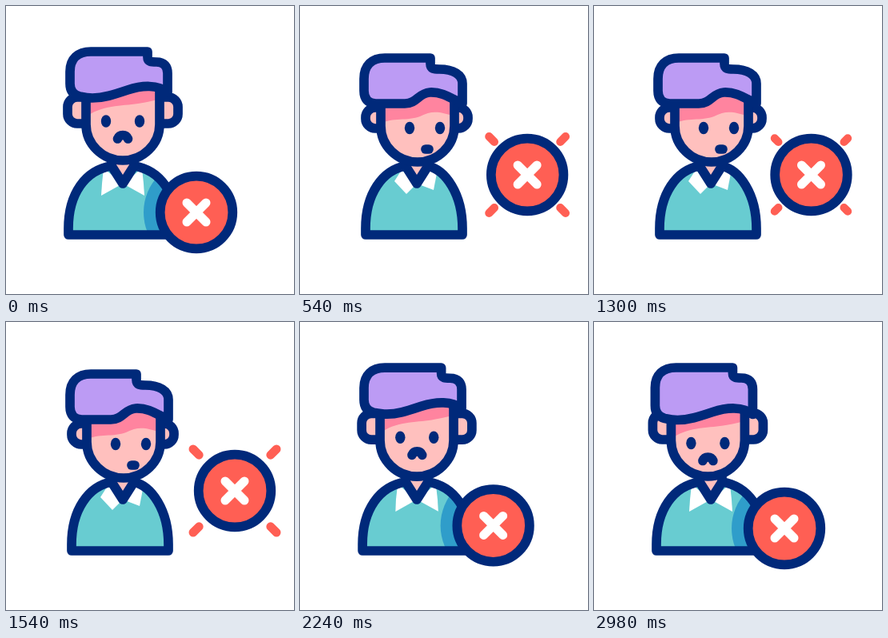
These frames come from a looping animation (360x360 px, 3 s). An HTML page:

```html
<!DOCTYPE html>
<html lang="en">
<head>
<meta charset="utf-8">
<title>Rejected user</title>
<style>
html, body { margin: 0; width: 100%; height: 100%; overflow: hidden; background: #fff; }
svg { display: block; width: 100vw; height: 100vh; }
.line { fill: none; stroke: #00297a; stroke-width: 11.7; stroke-linecap: round; stroke-linejoin: round; }
.skin { fill: #ffc0be; }
.shade { fill: #ff849f; }
.hair { fill: #bc9bf4; }
.shirt { fill: #68ccd1; }
.ink { fill: #00297a; }
.red { fill: #ff5f54; }
</style>
</head>
<body>
<svg viewBox="0 0 360 360">
  <defs><clipPath id="torso"><path class="body"/></clipPath></defs>

  <path class="body shirt"/>
  <g clip-path="url(#torso)"><circle id="shadow" r="66" fill="#2f9dca"/></g>
  <path fill="#fff" data-shape="collarL"/>
  <path fill="#fff" data-shape="collarR"/>
  <path class="skin" d="M132 185H160V200L146 222L132 200Z"/>
  <path class="body line"/>
  <path class="line" d="M132 190V200M160 190V200"/>

  <g id="head">
    <rect class="ear line skin" rx="12"/>
    <rect class="ear line skin" rx="12"/>
    <path class="face skin"/>
    <path class="drop shade" data-shape="fringe"/>
    <path class="face line"/>
    <path class="line hair" data-shape="hair"/>
    <g class="drop">
      <ellipse class="eye ink" rx="6.2" ry="7.7"/>
      <ellipse class="eye ink" rx="6.2" ry="7.7"/>
      <path class="line" data-shape="mouth"/>
    </g>
  </g>

  <g id="badge">
    <path id="burst" fill="none" stroke="#ff5f54" stroke-linecap="round"/>
    <circle class="line red" r="45.3"/>
    <path d="M-12 -12L12 12M12 -12L-12 12" stroke="#fff" stroke-width="11" stroke-linecap="round"/>
  </g>
</svg>
<script>
const LOOP = 3000;

// Each shape: sad pose, surprised pose.
const shapes = {
  collarL: ["M122 203L120 222L119 237L146 222Z", "M127 205L118 219L133 235L146 222Z"],
  collarR: ["M170 203L172 222L173 237L146 222Z", "M164 203L171 209L167 230L146 222Z"],
  fringe: [
    "M100 139C118 124 145 125 165 122C178 120 186 118 192 116L192 96L100 100Z",
    "M101 147C115 139 135 144 150 138C165 130 175 132 193 138L193 105L101 105Z"],
  hair: [
    "M80 97L80 82C80 66 90 57 106 57L177 57L177 64C177 70 182 70 188 70C198 70 202 76 202 84L202 108C190 98 170 99 152 105C134 111 122 115 108 115C102 115 97 114 92 113C84 111 80 106 80 97Z",
    "M80 106L80 91C80 74 90 65 106 65L163 65L163 72C163 79 168 79 174 79C192 79 203 86 203 97L203 122C191 117 179 107 162 108C148 109 146 122 131 122C115 122 105 122 95 122C85 122 80 116 80 106Z"],
  mouth: ["M139.5 166C142 160 150 160 152.5 166", "M157 179C158 179 160 179 161 179"]
};

const mix = (a, b, k) => a + (b - a) * k;
const clamp = k => Math.min(1, Math.max(0, k));
const span = (t, from, to) => clamp((t - from) / (to - from));
const ramp = (t, from, to) => {
  const k = span(t, from, to);
  return k * k * (3 - 2 * k);
};

function morph([a, b], k) {
  const ends = b.match(/[\d.]+/g);
  let i = 0;
  return a.replace(/[\d.]+/g, n => mix(+n, +ends[i++], k).toFixed(2));
}

// Moves only the lower edge of a path.
const lowerEdge = (path, dy) => path.replace(/([\d.]+) ([\d.]+)/g,
  (pair, x, y) => y > 90 ? `${x} ${+y + dy}` : pair);

const bodyPath = (l, r) =>
  `M${l} 286V278C${l} 235 ${l + 21} 205 132 200L146 222L160 200` +
  `C${r - 21} 205 ${r} 235 ${r} 278V286Z`;

const set = (el, attrs) => {
  for (const name in attrs) el.setAttribute(name, attrs[name]);
};
const all = selector => [...document.querySelectorAll(selector)];
const [head, badge, shadow, burst] = all("#head, #badge, #shadow, #burst")
  .sort((a, b) => order(a) - order(b));
function order(el) { return ["head", "badge", "shadow", "burst"].indexOf(el.id); }
const bodies = all(".body"), ears = all(".ear"), eyes = all(".eye");
const drops = all(".drop"), parts = all("[data-shape]");
all(".face").forEach(f => set(f, { d: "M100 112V148C100 173 121 193 146 193S192 173 192 148V106" }));
const faces = all(".face");

function drawBurst(t) {
  const local = t >= 1280 ? t - 800 : t;
  const u = span(local, 480, 980);
  const far = 40 + 14.7 * u ** 0.3;
  const near = Math.min(far, 41 + 13.7 * u * u) - 0.01;
  const width = local < 480 ? 0 : mix(10, 11.5, u) * (1 - span(local, 980, 1060));
  const ray = (x, y) => `M${x * near} ${y * near}L${x * far} ${y * far}`;
  set(burst, {
    d: ray(-1, -1) + ray(1, -1) + ray(1, 1) + ray(-1, 1),
    "stroke-width": width,
    visibility: width ? "visible" : "hidden"
  });
}

function drawHead(t, k) {
  const droop = 7.5 * ramp(t, 2260, 2500);
  const swing = -3.6 * Math.sin(2.5 * Math.PI * span(t, 2260, 2980));
  set(head, { transform: `translate(${swing} 0)` });
  drops.forEach(el => set(el, { transform: `translate(0 ${droop})` }));
  faces.forEach(el => set(el, { transform: `translate(${k} ${2 * k})` }));
  parts.forEach(el => {
    const name = el.dataset.shape, d = morph(shapes[name], k);
    set(el, { d: name === "hair" ? lowerEdge(d, droop) : d });
  });

  const inset = 5 * k;
  ears.forEach((ear, i) => set(ear, {
    x: i ? 180 : 77 + inset, width: 35 - inset,
    y: mix(114, 127, k), height: mix(33, 26, k)
  }));
  eyes.forEach((eye, i) => set(eye, {
    cx: i ? mix(167, 175, k) : mix(125, 137, k), cy: mix(144, 152.5, k)
  }));
}

function draw(t) {
  const pose = ramp(t, 260, 520) - ramp(t, 1925, 2275);
  const back = ramp(t, 1925, 2305);
  const recoil = 0.55 * (ramp(t, 1060, 1220) - ramp(t, 1245, 1365));
  const x = 238 + 48 * (ramp(t, 400, 560) - recoil - back);
  const y = 258 - 47 * (ramp(t, 400, 530) - back);

  const body = bodyPath(mix(78, 82, pose), mix(214, 203, pose));
  bodies.forEach(el => set(el, { d: body }));
  drawHead(t, pose);
  set(badge, { transform: `translate(${x} ${y})` });
  set(shadow, { cx: x, cy: y });
  drawBurst(t);
}

const start = performance.now();
function tick() {
  draw((performance.now() - start) % LOOP);
  requestAnimationFrame(tick);
}
tick();
</script>
</body>
</html>
```
